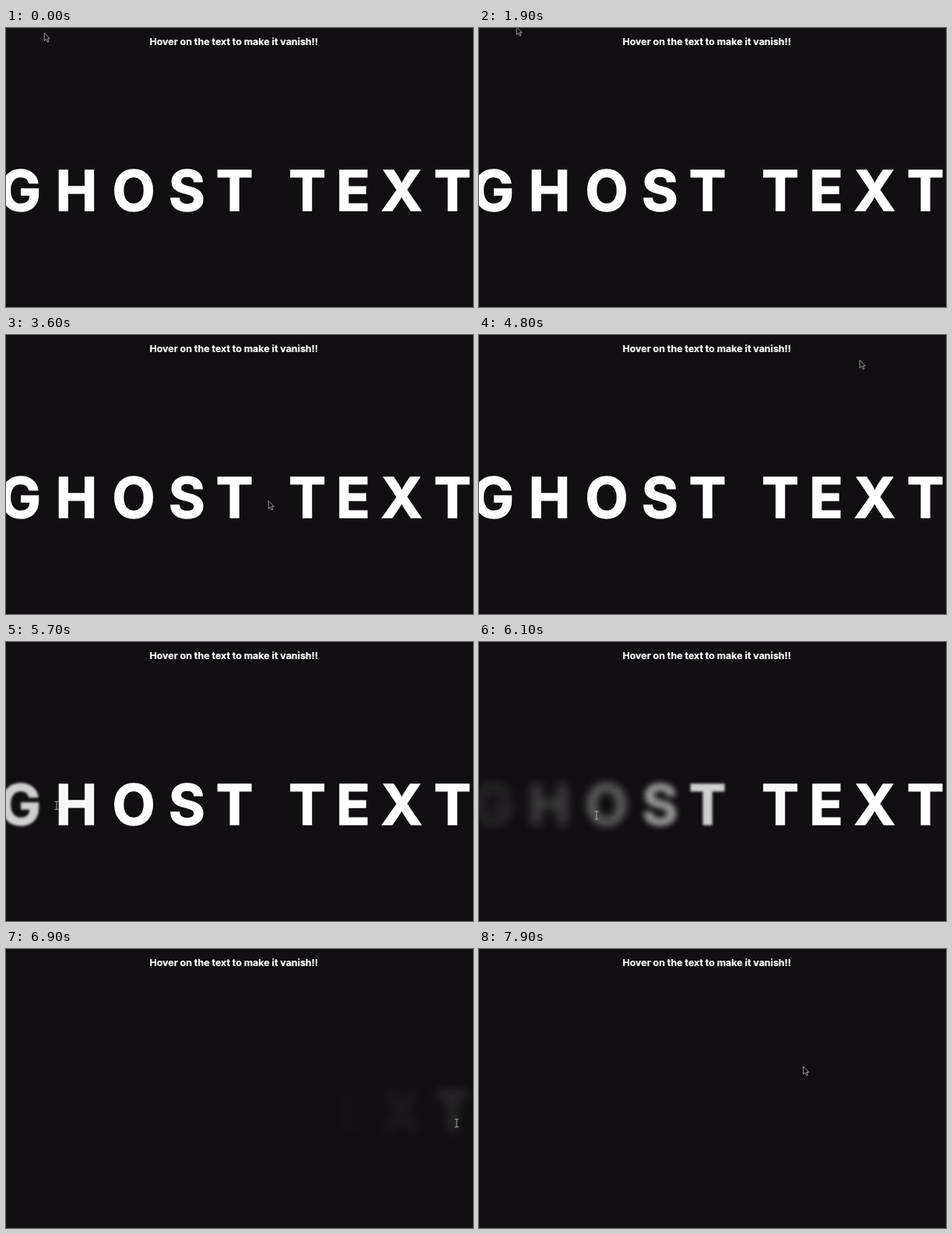
Animation of 600 by 359 pixels, one loop 8000 ms. Source, as an HTML page:

```html
<!DOCTYPE html>
<html lang="en">
<head>
<meta charset="utf-8">
<title>Ghost text</title>
<style>
html, body { margin: 0; height: 100%; overflow: hidden; background: #110f11; }
svg { display: block; width: 100%; height: 100%; }
text { font-family: Inter, "Open Sans", sans-serif; font-weight: 700; fill: #fff; stroke: #fff; text-anchor: middle; }
#hint { font-size: 12.4px; stroke-width: .2px; }
#word text { font-size: 71.5px; stroke-width: 1.5px; }
#arrow { fill: #110f11; stroke: #bbb; stroke-width: .8; }
#beam { fill: none; stroke: #aaa; }
</style>
</head>
<body>
<svg viewBox="0 0 600 359">
  <text id="hint" x="292.7" y="21.8">Hover on the text to make it vanish!!</text>
  <g id="word"></g>
  <path id="arrow" d="M-.8 -.6V9.4L1.6 7.4 3.4 11.2 5 10.4 3.4 6.8H6.4Z"/>
  <path id="beam" d="M-2.5 -5H2.5M0 -5V5M-2.5 5H2.5"/>
</svg>
<script>
const LOOP = 8000, STEP = 100;
const VANISH = 5560, STAGGER = 100, FADE = 900;
const centres = [18, 90.5, 164, 232.5, 293.5, 387, 446, 508.5, 573.5];
const $ = id => document.getElementById(id);

const fades = [..."GHOSTTEXT"].map((char, i) => {
  const el = document.createElementNS("http://www.w3.org/2000/svg", "text");
  el.textContent = char;
  el.setAttribute("x", centres[i]);
  el.setAttribute("y", 235);
  $("word").append(el);
  const fade = el.animate(
    [{ opacity: 1, filter: "blur(0px)" }, { opacity: 0, filter: "blur(8px)" }],
    { delay: VANISH + i * STAGGER, duration: FADE, easing: "ease", fill: "both" }
  );
  fade.pause();
  return fade;
});

// Pointer path: time, x, y
const path = [
  [0, 50, 7], [800, 50, 7], [1900, 49, -1], [2500, 8, 207], [3400, 238, 219],
  [3600, 338, 214], [4300, 590, 38], [4400, 490, 29], [5100, 490, 36], [5500, 22, 204],
  [6100, 151, 223], [6500, 279, 225], [6900, 579, 224], [7300, 384, 222], [LOOP, 423, 140]
];

function pointer(t) {
  const i = path.findIndex(p => p[0] > t);
  const [t0, x0, y0] = path[i - 1], [t1, x1, y1] = path[i];
  const k = (t - t0) / (t1 - t0);
  return [x0 + (x1 - x0) * k, y0 + (y1 - y0) * k];
}

function draw(now) {
  const t = Math.floor(now % LOOP / STEP) * STEP;
  for (const fade of fades) fade.currentTime = t;
  const overText = t >= 5500 && t < 7500;
  $("arrow").style.display = overText ? "none" : "";
  $("beam").style.display = overText ? "" : "none";
  $(overText ? "beam" : "arrow").setAttribute("transform", `translate(${pointer(t)})`);
  requestAnimationFrame(draw);
}
requestAnimationFrame(draw);
</script>
</body>
</html>
```
